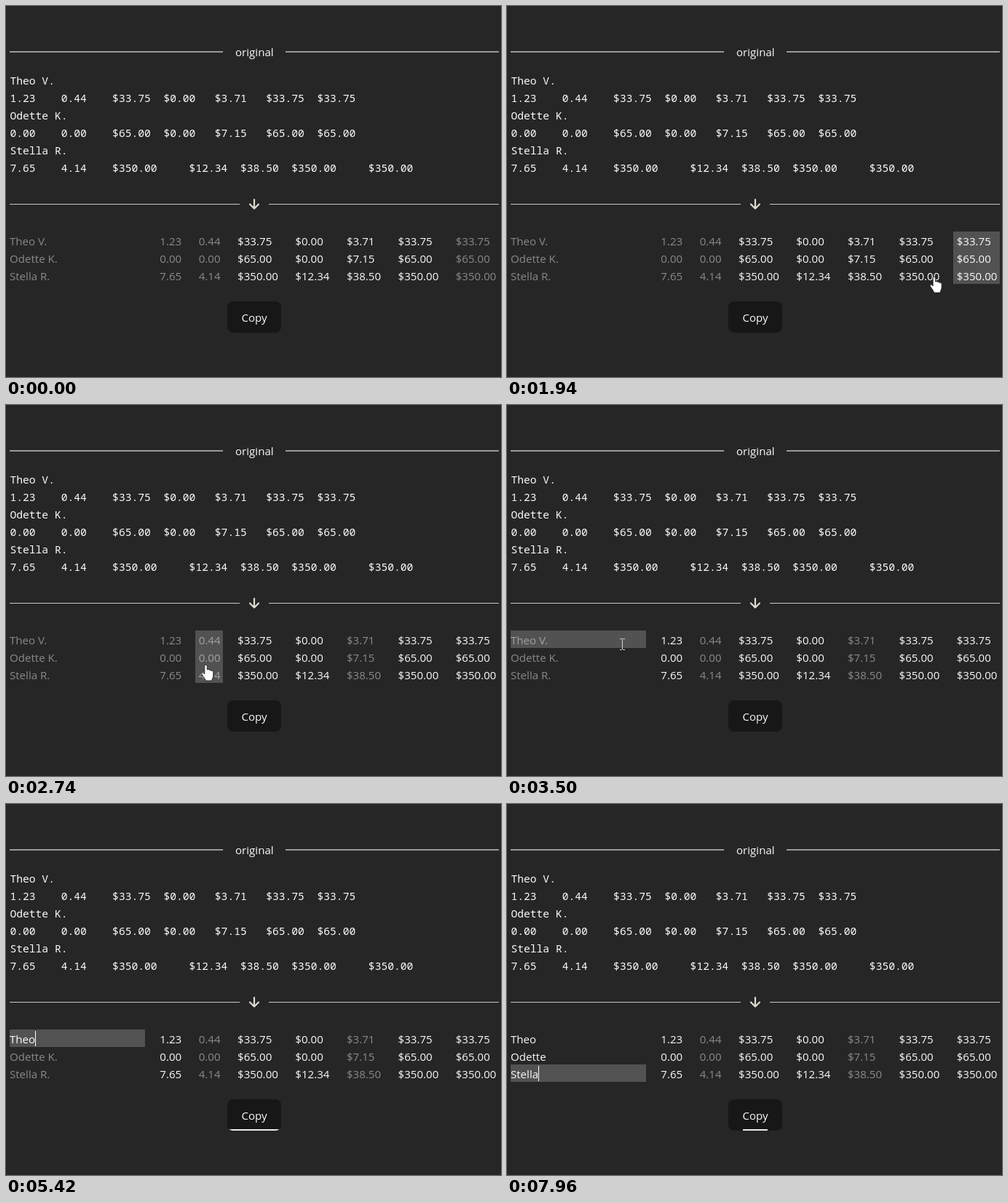
Animation, 680 px wide and 510 px high, one loop 7990 ms. Source, as an HTML page:

```html
<!DOCTYPE html>
<html lang="en">
<head>
<meta charset="utf-8">
<title>Column picker</title>
<style>
  html, body { margin: 0; width: 100%; height: 100%; overflow: hidden; background: #262626; }
  svg { display: block; width: 100vw; height: 100vh; }
  text { font: 15.1px "Open Sans", "Noto Sans", sans-serif; fill: #fafafa; white-space: pre; }
  .mono { font: 500 14.667px "Noto Sans Mono", "DejaVu Sans Mono", monospace; }
  .dim { fill: #fff; fill-opacity: .46; }
</style>
</head>
<body>
<svg viewBox="0 0 680 510">
  <defs>
    <clipPath id="button"><rect x="304" y="406" width="74" height="43" rx="8"/></clipPath>
  </defs>
  <rect width="680" height="510" fill="#262626"/>
  <path d="M5 63H298M384 63H677" stroke="#999" stroke-width="2"/>
  <path d="M5 272.5H321M361 272.5H677" stroke="#c8c8c4"/>
  <path d="M341 266V278.500M335 272.500l6 6 6-6" fill="none" stroke="#dedcd2" stroke-width="2.200" stroke-linecap="round" stroke-linejoin="round"/>
  <text x="341.300" y="69" text-anchor="middle">original</text>
  <g id="raw"></g>
  <rect id="mark" fill="#525252"/>
  <g id="table"></g>
  <rect id="caret" width="1" height="21" fill="#fff"/>
  <g clip-path="url(#button)">
    <rect x="304" y="406" width="74" height="43" fill="#171717"/>
    <rect id="bar" y="447" height="2" fill="#ececec"/>
  </g>
  <text x="341" y="434" text-anchor="middle">Copy</text>
  <g id="cursor">
    <path id="arrow" d="M0 0V16.500L3.800 13L6.300 18.600L8.700 17.600L6.300 12.100H11.500Z" fill="#fff" stroke="#111" stroke-width=".8"/>
    <path id="hand" d="M-2 1.500C-2-.5 1.500-.5 1.500 1.500V6.500C2 5.300 4.700 5.600 4.700 7.300C5.200 6.200 7.500 6.600 7.500 8.300C8 7.300 10 7.800 10 9.500V14.500C10 17.500 8 18.500 8 21.500H-.8C-.8 19-2 18.500-2.800 17L-5.500 13C-6.800 10.800-4.500 9.700-3.300 11L-2 12.500Z" fill="#fff" stroke="#111" stroke-width=".8"/>
    <path id="beam" d="M-3.500-7.500H-1L0-6.700L1-7.500H3.500M0-6.700V6.700M-3.500 7.500H-1L0 6.700L1 7.500H3.500" fill="none" stroke="#d8d8d8"/>
  </g>
</svg>
<script>
const LOOP = 7990, TOP = 310, ROW = 24, BOTTOM = TOP + 3 * ROW;
const $ = id => document.getElementById(id);
const set = (el, attrs) => { for (const k in attrs) el.setAttribute(k, attrs[k]); };
const show = (el, on) => { el.style.display = on ? '' : 'none'; };

function addText(parent, x, y, str, cls = '') {
  const el = document.createElementNS('http://www.w3.org/2000/svg', 'text');
  set(el, { x, y, class: cls });
  el.textContent = str;
  parent.append(el);
  return el;
}

const people = [
  { name: 'Theo', full: 'Theo V.', focus: 4030, keys: [4930, 5120, 5190, 5420],
    cells: '1.23 0.44 $33.75 $0.00 $3.71 $33.75 $33.75' },
  { name: 'Odette', full: 'Odette K.', focus: 5520, keys: [5830, 6000, 6070, 6230, 6310, 6400],
    cells: '0.00 0.00 $65.00 $0.00 $7.15 $65.00 $65.00' },
  { name: 'Stella', full: 'Stella R.', focus: 6600, keys: [6990, 7060, 7120, 7260, 7370, 7490],
    cells: '7.65 4.14 $350.00 $12.34 $38.50 $350.00 $350.00' }
];
const allKeys = people.flatMap(p => p.keys);

// Columns: box width, whether it starts enabled, time of the toggling click
let left = 207;
const columns = [
  [37.4, false, 3220], [37.4, false], [63.2, true], [54.6, true],
  [54.6, true, 2370], [63.2, true], [63.2, false, 1700]
].map(([width, on, click = Infinity]) => {
  const x = Math.round(left), w = Math.round(left + width) - x;
  const col = { x, w, textX: left + 4.3, on, click, texts: [] };
  left += width + 16;
  return col;
});

people.forEach((p, r) => {
  const cells = p.cells.split(' ');
  // Wide amounts push the next one to a later tab stop
  const line = cells.map(c => c.padEnd(c.length > 6 ? 12 : 8)).join('');
  addText($('raw'), 5.4, 108 + r * 48, p.full, 'mono');
  addText($('raw'), 5.4, 132 + r * 48, line, 'mono');
  const y = 329 + r * ROW;
  p.el = addText($('table'), 5, y, p.full);
  cells.forEach((c, i) => columns[i].texts.push(addText($('table'), columns[i].textX, y, c)));
});

// Pointer: time, x, y
const path = [
  [860, 630, 505], [1050, 632, 482], [1300, 641, 410], [1600, 645, 358],
  [1850, 645, 358], [1915, 620, 366], [1940, 588, 372.5], [1990, 545, 376],
  [2100, 491, 370], [2400, 491, 370], [2550, 425, 365], [2640, 345, 361],
  [2740, 275, 357.5], [2900, 240, 352], [3150, 227, 348], [3430, 227, 348],
  [3465, 185, 331], [3500, 159, 329], [3570, 125, 320], [3670, 110, 317],
  [3930, 110, 317], [4030, 114, 321], [4280, 164, 288], [4360, 168, 292]
];

function pointer(t) {
  const i = path.findIndex(p => p[0] > t);
  if (i < 0) return path[path.length - 1].slice(1);
  if (i === 0) return path[0].slice(1);
  const [a, b] = [path[i - 1], path[i]];
  const k = (t - a[0]) / (b[0] - a[0]);
  return [a[1] + (b[1] - a[1]) * k, a[2] + (b[2] - a[2]) * k];
}

const rowBox = r => ({ x: 5, y: TOP + r * ROW, width: 186, height: ROW });

function hit([x, y]) {
  if (y < TOP || y >= BOTTOM) return null;
  if (x >= 5 && x < 191) return { kind: 'beam', box: rowBox(Math.floor((y - TOP) / ROW)) };
  const col = columns.find(c => x >= c.x && x < c.x + c.w);
  return col && { kind: 'hand', box: { x: col.x, y: TOP, width: col.w, height: BOTTOM - TOP } };
}

function draw(t) {
  for (const c of columns) {
    const on = c.on !== (t >= c.click);
    c.texts.forEach(el => set(el, { class: on ? '' : 'dim' }));
  }

  let active = -1;
  people.forEach((p, r) => {
    if (t >= p.focus) active = r;
    p.typed = p.keys.filter(k => k <= t).length;
    p.el.textContent = p.typed ? p.name.slice(0, p.typed) : p.full;
    set(p.el, { class: p.typed ? '' : 'dim' });
  });

  // Hover follows the pointer slightly late
  const visible = t >= 860 && t < 4960;
  const over = visible ? hit(pointer(t - 25)) : null;
  const box = active >= 0 ? rowBox(active) : over && over.box;
  show($('mark'), box);
  if (box) set($('mark'), box);

  show($('cursor'), visible);
  const [x, y] = pointer(t);
  set($('cursor'), { transform: `translate(${x} ${y})` });
  const kind = over ? over.kind : 'arrow';
  for (const id of ['arrow', 'hand', 'beam']) show($(id), id === kind);

  const p = people[active];
  const since = p && t - (p.typed ? p.keys[p.typed - 1] : p.focus);
  show($('caret'), p && since % 1000 < 500);
  if (p) {
    const w = p.typed ? p.el.getComputedTextLength() : 0;
    set($('caret'), { x: Math.round(5 + w), y: 312 + active * ROW });
  }

  // Underline waits 200 ms after a key, then shrinks to its centre
  const last = Math.max(-1e4, ...allKeys.filter(k => k <= t));
  const width = 74 * Math.max(0, 1 - Math.max(0, t - last - 200) / 500);
  set($('bar'), { x: 341 - width / 2, width });
}

const start = performance.now();
function tick() {
  draw((performance.now() - start) % LOOP);
  requestAnimationFrame(tick);
}
tick();
</script>
</body>
</html>
```
